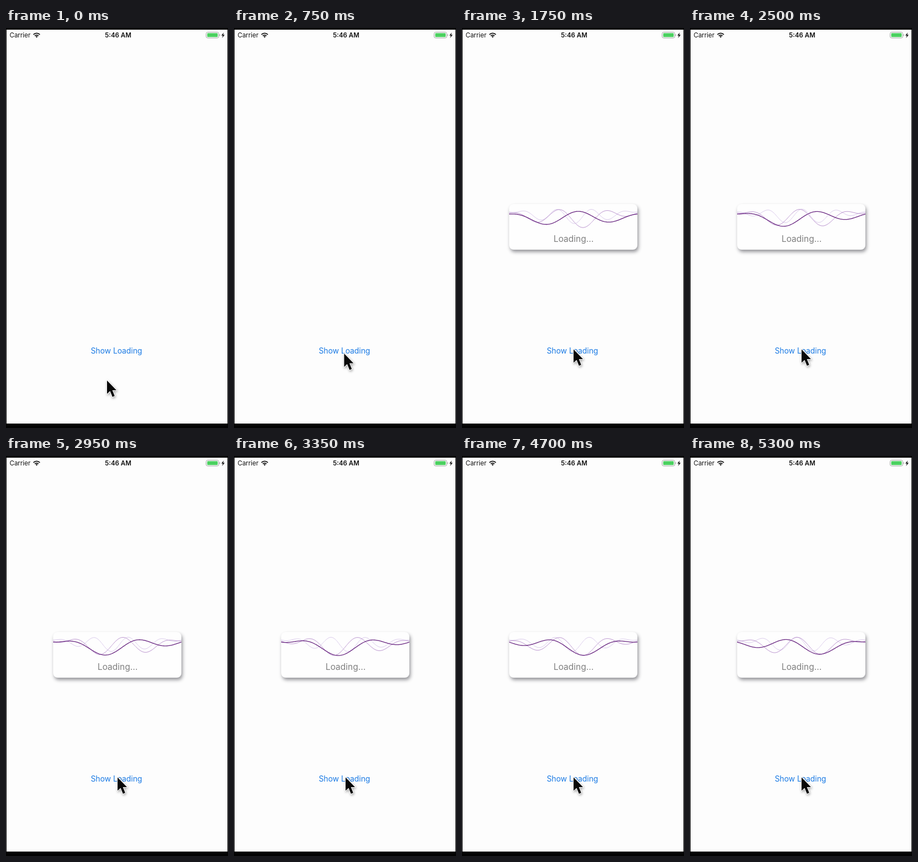
An HTML page for the animation above (5350 ms loop, 400x720 px).

```html
<!DOCTYPE html>
<html lang="en">
<head>
<meta charset="utf-8">
<title>Loading waves</title>
<style>
  html, body { margin: 0; width: 100%; height: 100%; overflow: hidden; background: #000; }
  svg { display: block; width: 400px; height: 720px; font-family: Inter, Roboto, "Liberation Sans", sans-serif; }
  #box { filter: drop-shadow(2px 4px 3px rgba(20, 20, 30, .45)); }
  #cursor { filter: drop-shadow(1px 2px 2px rgba(0, 0, 0, .35)); }
  .wave { fill: none; }
</style>
</head>
<body>
<svg viewBox="0 0 400 720">
  <rect width="400" height="720" fill="#030303"/>
  <rect x="1" y="3" width="398" height="709" fill="#fdfdfd"/>

  <text x="6.5" y="17" font-size="11.5" fill="#111">Carrier</text>
  <g fill="none" stroke="#111" stroke-width="1.8">
    <path d="M49.4 11.8a8.2 8.2 0 0 1 11.6 0"/>
    <path d="M51.8 14.2a4.8 4.8 0 0 1 6.8 0"/>
    <path d="M53.3 15.4L55.2 17.6L57.1 15.4A2.6 2.6 0 0 0 53.3 15.4Z" fill="#111" stroke="none"/>
  </g>
  <text x="202" y="17" font-size="11.5" font-weight="600" text-anchor="middle" fill="#111">5:46 AM</text>
  <rect x="360.5" y="7.5" width="23" height="10.5" rx="3" fill="#fdfdfd" stroke="#a4a6a4"/>
  <rect x="362.5" y="9.3" width="19" height="7" rx="1.4" fill="#4bd160"/>
  <path d="M384.6 11v3.6q1.4-.5 1.4-1.8t-1.4-1.8Z" fill="#a4a6a4"/>
  <path d="M392.4 8L388 13.6H390.7L389.4 18L394 12.2H391.2Z" fill="#111"/>

  <text x="199" y="585.5" font-size="13.8" text-anchor="middle" fill="#1a7ae4">Show Loading</text>

  <g id="card" opacity="0">
    <rect id="box" x="85" y="317" width="231" height="82" rx="8" fill="#fefefe"/>
    <path class="wave" stroke="#d9c8ea" stroke-width=".9"/>
    <path class="wave" stroke="#b78fcc" stroke-width=".9"/>
    <path class="wave" stroke="#6a2882" stroke-width="1.3"/>
    <text x="201" y="385" font-size="15.5" text-anchor="middle" fill="#7f7f7f">Loading...</text>
  </g>

  <g id="cursor">
    <path d="M0 .5V24.5L5.5 19.5L9.8 30L13.8 28.2L9.6 18H17Z"
      fill="#080808" stroke="#fff" stroke-width="2" stroke-linejoin="round" paint-order="stroke"/>
  </g>
</svg>
<script>
const LOOP = 5350, STEP = 50;
const LEFT = 85, RIGHT = 316, MID = 200.5;

// base: y at both ends, mid/amp: centre offset and swing,
// len: wavelength, crest: x of a crest at 1.3 s, speed: px per second
const waves = [
  { base: 331, mid: 8, amp: 13, len: 62, crest: 215, speed: 40.75 },
  { base: 333, mid: 10.2, amp: 16.8, len: 88, crest: 161.5, speed: 29.9 },
  { base: 335, mid: 9.75, amp: 14.75, len: 132, crest: 198, speed: 26.5 }
];

const card = document.getElementById('card');
const cursor = document.getElementById('cursor');
const paths = document.querySelectorAll('.wave');

function ease(t, from, to) {
  const p = Math.min(1, Math.max(0, (t - from) / (to - from)));
  return p * p * (3 - 2 * p);
}

function wavePath(w, t) {
  const crest = w.crest + w.speed * (t / 1000 - 1.3);
  const points = [];
  for (let x = LEFT; x <= RIGHT; x++) {
    const reach = Math.cos(Math.PI * (x - MID) / (RIGHT - LEFT));
    const swing = w.mid - w.amp * Math.cos(2 * Math.PI * (x - crest) / w.len);
    points.push(x + ' ' + (w.base + reach * swing).toFixed(2));
  }
  return 'M' + points.join('L');
}

function draw(t) {
  const move = ease(t, 250, 900);
  cursor.setAttribute('transform', `translate(${182 + 19 * move} ${634 - 56 * move})`);
  card.setAttribute('opacity', ease(t, 1080, 1480));
  waves.forEach((w, i) => paths[i].setAttribute('d', wavePath(w, t)));
}

const start = performance.now();
function frame() {
  const t = (performance.now() - start) % LOOP;
  draw(Math.floor(t / STEP) * STEP);
  requestAnimationFrame(frame);
}
frame();
</script>
</body>
</html>
```
